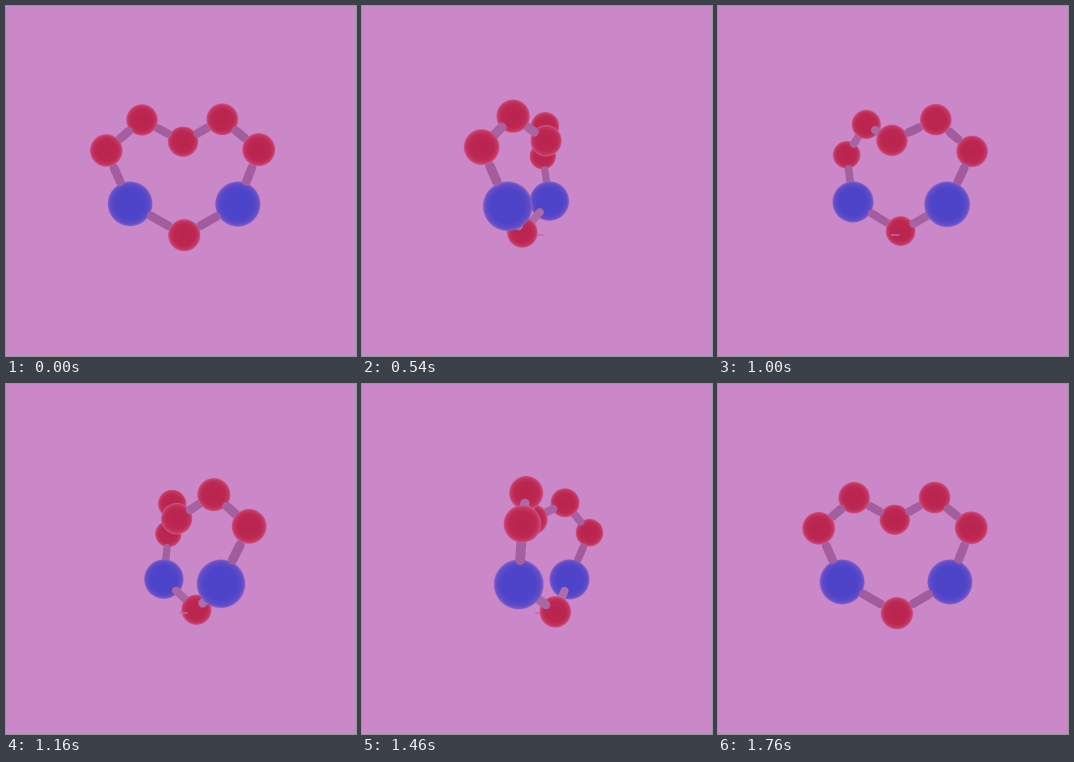
An HTML page with a canvas that plays this animation: 350x350 px, repeating every 1800 ms.

```html
<!DOCTYPE html>
<html lang="en">
<head>
<meta charset="utf-8">
<title>Rotating molecule</title>
<style>
  html, body { margin: 0; width: 100%; height: 100%; overflow: hidden; background: #cb88c8; }
  canvas { display: block; width: 350px; height: 350px; }
</style>
</head>
<body>
<canvas id="stage" width="350" height="350"></canvas>
<script>
const ctx = document.getElementById('stage').getContext('2d');
const LOOP = 1800, STEP = 20, LAST = 88, TURN = 1770;
const CX = 177, CY = 175, CAMERA = 430;
const RAD = Math.PI / 180;

// Ring order; polar position around the vertical axis: radius, phase, height.
const atoms = [
  { dist: 76,   phase: 163.5, y: -29,   kind: 'red' },
  { dist: 41,   phase: 169.5, y: -60,   kind: 'red' },
  { dist: 7.5,  phase: 270,   y: -40,   kind: 'red' },
  { dist: 40,   phase: 17,    y: -60,   kind: 'red' },
  { dist: 76,   phase: 21,    y: -29.4, kind: 'red' },
  { dist: 54.5, phase: 11,    y: 22.5,  kind: 'blue' },
  { dist: 17.5, phase: 86,    y: 52,    kind: 'red' },
  { dist: 52.5, phase: 173,   y: 22.5,  kind: 'blue' }
];

const kinds = {
  red: { r: 15.8, stops: [[0, '#b8244e'], [0.66, '#bb2751'], [0.86, '#c43560'],
    [0.95, '#c94f82'], [1, 'rgba(204,100,160,0.35)']] },
  blue: { r: 22.4, stops: [[0, '#4b43c8'], [0.66, '#4e44c8'], [0.86, '#5e4bc8'],
    [0.95, '#7a57c7'], [1, 'rgba(150,104,200,0.35)']] }
};

const mix = (a, b, k) => a + (b - a) * k;

function project(p) {
  const s = CAMERA / (CAMERA - p.z);
  return { x: CX + p.x * s, y: CY + p.y * s, s };
}

function place(atom, angle) {
  const a = (atom.phase + angle) * RAD;
  return { x: atom.dist * Math.cos(a), y: atom.y, z: atom.dist * Math.sin(a), ...kinds[atom.kind] };
}

function drawAtom(p) {
  const c = project(p), r = p.r * c.s;
  const g = ctx.createRadialGradient(c.x, c.y, 0, c.x, c.y, r);
  for (const [at, color] of p.stops) g.addColorStop(at, color);
  ctx.fillStyle = g;
  ctx.beginPath();
  ctx.arc(c.x, c.y, r, 0, 2 * Math.PI);
  ctx.fill();
}

// A rod trimmed to the surfaces of the two spheres it joins.
function makeBond(a, b) {
  const d = { x: b.x - a.x, y: b.y - a.y, z: b.z - a.z };
  const len = Math.hypot(d.x, d.y, d.z);
  const side = Math.hypot(d.x, d.y) / len;
  const along = k => ({ x: a.x + d.x * k, y: a.y + d.y * k, z: a.z + d.z * k });
  const trim = r => (r * 0.96 + 3 * side) / len;
  const from = along(trim(a.r)), to = along(1 - trim(b.r));
  const lift = 1 - side;
  const color = `rgb(${mix(162, 188, lift)},${mix(92, 132, lift)},${mix(157, 182, lift)})`;
  return { z: (from.z + to.z) / 2, draw() {
    const p = project(from), q = project(to);
    ctx.strokeStyle = color;
    ctx.lineCap = 'round';
    ctx.lineWidth = 8.4 * (p.s + q.s) / 2;
    ctx.beginPath();
    ctx.moveTo(p.x, p.y);
    ctx.lineTo(q.x, q.y);
    ctx.stroke();
  } };
}

const dash = { z: -8, draw() {
  ctx.fillStyle = '#bd6fa9';
  ctx.fillRect(173, 228.2, 8.5, 1.5);
} };

function render(time) {
  const step = Math.min(LAST, Math.floor((time % LOOP) / STEP));
  const angle = 360 * step * STEP / TURN;
  const spheres = atoms.map(a => place(a, angle));
  const parts = [dash];
  spheres.forEach((p, i) => {
    parts.push({ z: p.z, draw: () => drawAtom(p) });
    parts.push(makeBond(p, spheres[(i + 1) % spheres.length]));
  });
  ctx.fillStyle = '#cb88c8';
  ctx.fillRect(0, 0, 350, 350);
  parts.sort((a, b) => a.z - b.z).forEach(part => part.draw());
}

let start;
function tick(now) {
  if (start === undefined) start = now;
  render(Math.max(0, now - start));
  requestAnimationFrame(tick);
}
render(0);
requestAnimationFrame(tick);
</script>
</body>
</html>
```
